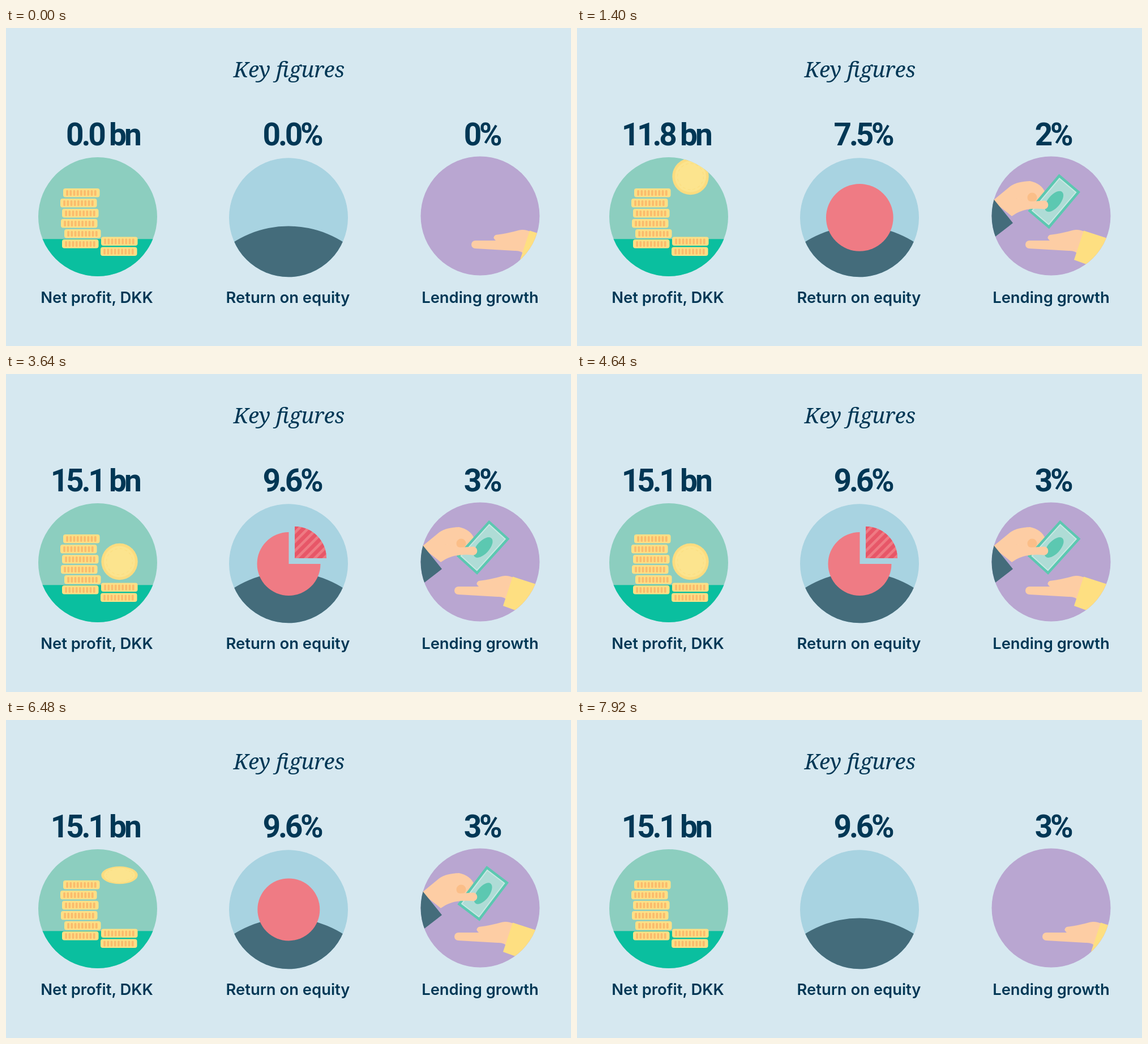
An HTML page that plays this animation: 998x561 px, repeating every 7.96 s.

```html
<!DOCTYPE html>
<html lang="en">
<head>
<meta charset="utf-8">
<title>Key figures</title>
<style>
  html, body { margin: 0; width: 100%; height: 100%; overflow: hidden; background: #d6e8f0; }
  svg { display: block; width: 100vw; height: 100vh; }
  text { fill: #003755; }
  .title { font: italic 400 38.4px "Noto Serif", serif; text-anchor: middle; }
  .figure { font: 700 55px Roboto, sans-serif; letter-spacing: -4.2px; text-anchor: end; }
  .label { font: 600 27.4px Inter, sans-serif; text-anchor: middle; }
</style>
</head>
<body>
<svg viewBox="0 0 998 561">
  <defs>
    <clipPath id="profitClip"><circle cx="162" cy="333" r="105"/></clipPath>
    <clipPath id="equityClip"><circle cx="499" cy="334.3" r="105"/></clipPath>
    <clipPath id="lendingClip"><circle cx="837.5" cy="331.5" r="105"/></clipPath>
    <pattern id="stripes" width="11.4" height="11.4" patternUnits="userSpaceOnUse" patternTransform="rotate(45)">
      <rect width="11.4" height="11.4" fill="#e75768"/>
      <rect width="4.6" height="11.4" fill="#ef7b84"/>
    </pattern>
  </defs>

  <text class="title" x="500" y="87">Key figures</text>
  <text class="figure" id="profit" x="235.5" y="206.5"></text>
  <text class="figure" id="equity" x="556.5" y="206.5"></text>
  <text class="figure" id="lending" x="872.5" y="206.5"></text>
  <text class="label" x="160.5" y="485">Net profit, DKK</text>
  <text class="label" x="498" y="485">Return on equity</text>
  <text class="label" x="837.5" y="485">Lending growth</text>

  <g clip-path="url(#profitClip)">
    <rect x="57" y="228" width="210" height="210" fill="#8ccebf"/>
    <rect x="57" y="372.3" width="210" height="66" fill="#0abf9f"/>
    <g id="stacks"></g>
    <g id="coin">
      <circle r="32.2" fill="#fcdc7f"/>
      <circle r="27.5" fill="#fce48e"/>
      <circle r="23" fill="none" stroke="#fbdf83" stroke-width="1.5" stroke-dasharray="5 4"/>
    </g>
  </g>

  <g clip-path="url(#equityClip)">
    <rect x="394" y="229" width="210" height="211" fill="#a8d3e1"/>
    <circle cx="499" cy="531" r="181.4" fill="#446c7b"/>
    <g fill="#ef7b84">
      <circle id="disc" cx="499.3" cy="334.4"/>
      <g id="pie">
        <path d="M499.5 335V279A56 56 0 1 0 555.5 335Z"/>
        <g id="wedge">
          <path d="M0 0V-56A56 56 0 0 1 56 0Z"/>
          <path id="hatch" d="M0 0V-56A56 56 0 0 1 56 0Z" fill="url(#stripes)"/>
        </g>
      </g>
    </g>
  </g>

  <g clip-path="url(#lendingClip)">
    <rect x="732" y="226" width="211" height="211" fill="#b9a6d1"/>
    <g id="giver">
      <path d="M734 305L762 282Q773 271 800 270Q820 274 827 290Q824 302 812 308L802 318Q783 321 768 332Z" fill="#fdcda4"/>
      <circle cx="804" cy="299" r="8.5" fill="#fbbe88"/>
      <g id="note">
        <rect x="-24.5" y="-42.7" width="49" height="85.4" fill="#5cc8b1"/>
        <rect x="-19" y="-37.2" width="38" height="74.4" fill="#afdcd6" stroke="#c8e8e3" stroke-width="2"/>
        <ellipse rx="11" ry="22" fill="#5cc8b1"/>
      </g>
      <path d="M776 300L802 306L826 304.5A7.6 7.6 0 0 1 826 319.5Q798 317 782 324Z" fill="#fdcda4"/>
      <path d="M700 262L736 302L770 344L739 368L700 390Z" fill="#446c7b"/>
    </g>
    <g id="taker">
      <path d="M799 375L835 375Q828 369 835 365Q858 362 875 357Q886 354 898 360L886 400Q880 392 868 393L799 389A7 7 0 0 1 799 375Z" fill="#fdcda4"/>
      <path d="M895 357.5L962 379L942 432L878 409Z" fill="#fedf81"/>
    </g>
  </g>
</svg>

<script>
const LOOP = 7960;
const MIRROR = 8018; // the pictures leave the way they came in
const COUNT_TIME = 1795;
const ROCK_PERIOD = 1036;
const $ = id => document.getElementById(id);
const move = (id, transform) => $(id).setAttribute("transform", transform);

// Smoothstep between two moments.
function ease(t, start, end) {
  const p = Math.min(1, Math.max(0, (t - start) / (end - start)));
  return p * p * (3 - 2 * p);
}

function stackedCoin(x, y) {
  let ridges = "";
  for (let i = 0; i < 9; i++) {
    ridges += `<rect x="${x + 5.2 + i * 6.2}" y="${y + 3}" width="3.8" height="10" rx="1.5"/>`;
  }
  return `<rect x="${x}" y="${y}" width="64.5" height="15.5" rx="4" fill="#fddf86"/><g fill="#fbbc6c">${ridges}</g>`;
}

const stackPlaces = [[101, 283], [96, 301], [99, 319], [97, 337], [103, 355], [99, 373], [168, 368.5], [167, 386.5]];
$("stacks").innerHTML = stackPlaces.map(([x, y]) => stackedCoin(x, y)).join("");

function drawCounters(t) {
  const p = Math.min(1, t / COUNT_TIME);
  $("profit").textContent = (15.1 * p).toFixed(1) + " bn";
  $("equity").textContent = (9.6 * p).toFixed(1) + "%";
  $("lending").textContent = (3 * p).toFixed(0) + "%";
}

function drawCoin(t) {
  const drop = ease(t, 200, 2600);
  const flip = Math.abs(Math.cos(drop * 4 * Math.PI));
  move("coin", `translate(200.5 ${193 + 138 * drop}) scale(1 ${Math.max(0.05, flip)})`);
}

function drawPie(t) {
  const split = ease(t, 1540, 1900);
  $("disc").setAttribute("r", 60 * ease(t, 1000, 1360) - 5 * ease(t, 1360, 1540));
  $("disc").style.display = split ? "none" : "";
  $("pie").style.display = split ? "" : "none";
  $("hatch").style.opacity = split;
  move("wedge", `translate(${499.5 + 10.5 * split} ${335 - 10 * split})`);
}

function drawHands(t, clock) {
  const arrive = ease(t, 200, 1300);
  const tilt = 37 - 5.2 * Math.cos(clock / ROCK_PERIOD * 2 * Math.PI);
  move("giver", `translate(${-165 * (1 - arrive)} 0)`);
  move("taker", `translate(${30 * (1 - arrive)} 0)`);
  move("note", `translate(842.7 306) rotate(${tilt})`);
}

function render(clock) {
  const t = Math.min(clock, MIRROR - clock);
  drawCounters(clock);
  drawCoin(t);
  drawPie(t);
  drawHands(t, clock);
}

const begin = performance.now();
function frame() {
  render((performance.now() - begin) % LOOP);
  requestAnimationFrame(frame);
}
frame();
</script>
</body>
</html>
```
